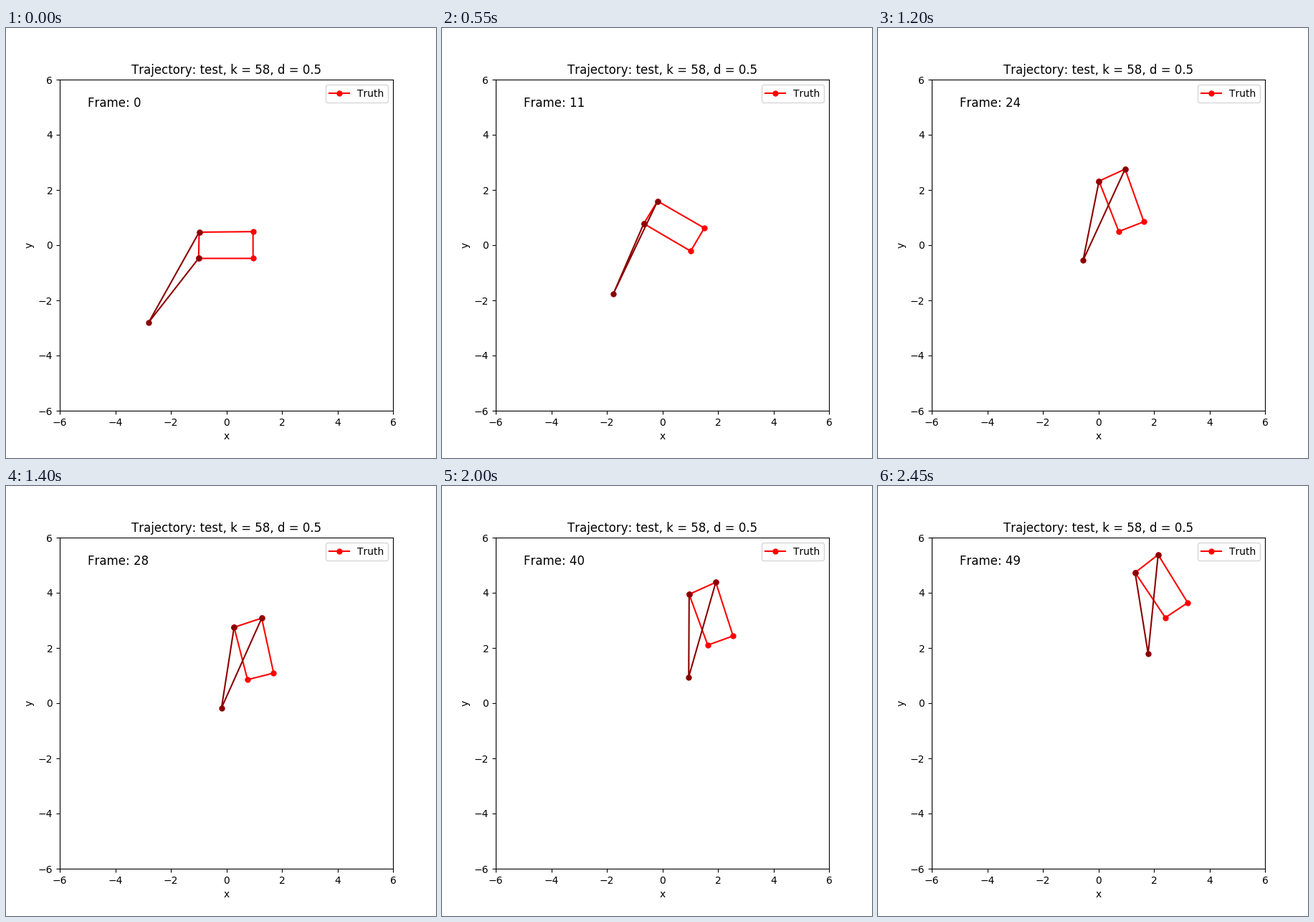
A matplotlib script that plays this animation: 600x600 px, repeating every 2.5 s.

```python
import numpy as np
import matplotlib.pyplot as plt
from matplotlib.animation import FuncAnimation

FRAMES = 50
INTERVAL = 50
LENGTH, WIDTH = 1.96, 0.97

# Key points of the box: time, centre x, centre y, heading in degrees
KEYS = np.array([
    (0, -0.02, 0.005, 0),
    (11, 0.42, 0.70, -30.5),
    (19, 0.67, 1.215, -55.6),
    (28, 0.99, 1.92, -75.7),
    (40, 1.755, 3.19, -70),
    (49, 2.27, 4.185, -56.3),
])
TIMES, POSES = KEYS[:, 0], KEYS[:, 1:]
SLOPES = np.gradient(POSES, TIMES, axis=0, edge_order=2)


def pose_at(t):
    """Cubic Hermite interpolation of centre and heading."""
    k = min(np.searchsorted(TIMES, t, side="right") - 1, len(TIMES) - 2)
    h = TIMES[k + 1] - TIMES[k]
    s = (t - TIMES[k]) / h
    blend = s * s * (3 - 2 * s)
    return ((1 - blend) * POSES[k] + blend * POSES[k + 1]
            + h * s * (1 - s) ** 2 * SLOPES[k]
            - h * s * s * (1 - s) * SLOPES[k + 1])


def box_at(t):
    """Corners from lower left, clockwise; the second is pulled outwards."""
    x, y, heading = pose_at(t)
    a, b = LENGTH / 2, WIDTH / 2
    pull = 0.03 + 0.05 * np.tanh((t - 19) / 6)
    local = np.array([(-a, -b), (-a - pull, b + pull), (a, b), (a, -b)])
    c, s = np.cos(np.radians(heading)), np.sin(np.radians(heading))
    return local @ np.array([(c, s), (-s, c)]) + (x, y)


def handle_at(t):
    """The pulling point moves evenly along the diagonal."""
    pos = -2.8 + 0.0937 * t
    return np.array([pos, pos])


plt.rcParams.update({"text.kerning_factor": 6, "lines.markersize": 5})
fig, ax = plt.subplots(figsize=(6, 6), dpi=100)
ax.set(xlim=(-6, 6), ylim=(-6, 6), xlabel="x", ylabel="y",
       title="Trajectory: test, k = 58, d = 0.5")
box, = ax.plot([], [], "o-", color="red", label="Truth")
arms, = ax.plot([], [], "o-", color="darkred")
counter = ax.text(-5, 5, "", fontsize=12)
ax.legend(loc="upper right")


def draw(i):
    corners = box_at(i)
    box.set_data(*np.vstack([corners, corners[:1]]).T)
    arms.set_data(*np.array([corners[0], handle_at(i), corners[1]]).T)
    counter.set_text(f"Frame: {i}")
    return box, arms, counter


anim = FuncAnimation(fig, draw, frames=FRAMES, interval=INTERVAL, repeat=True)
plt.show()
```
